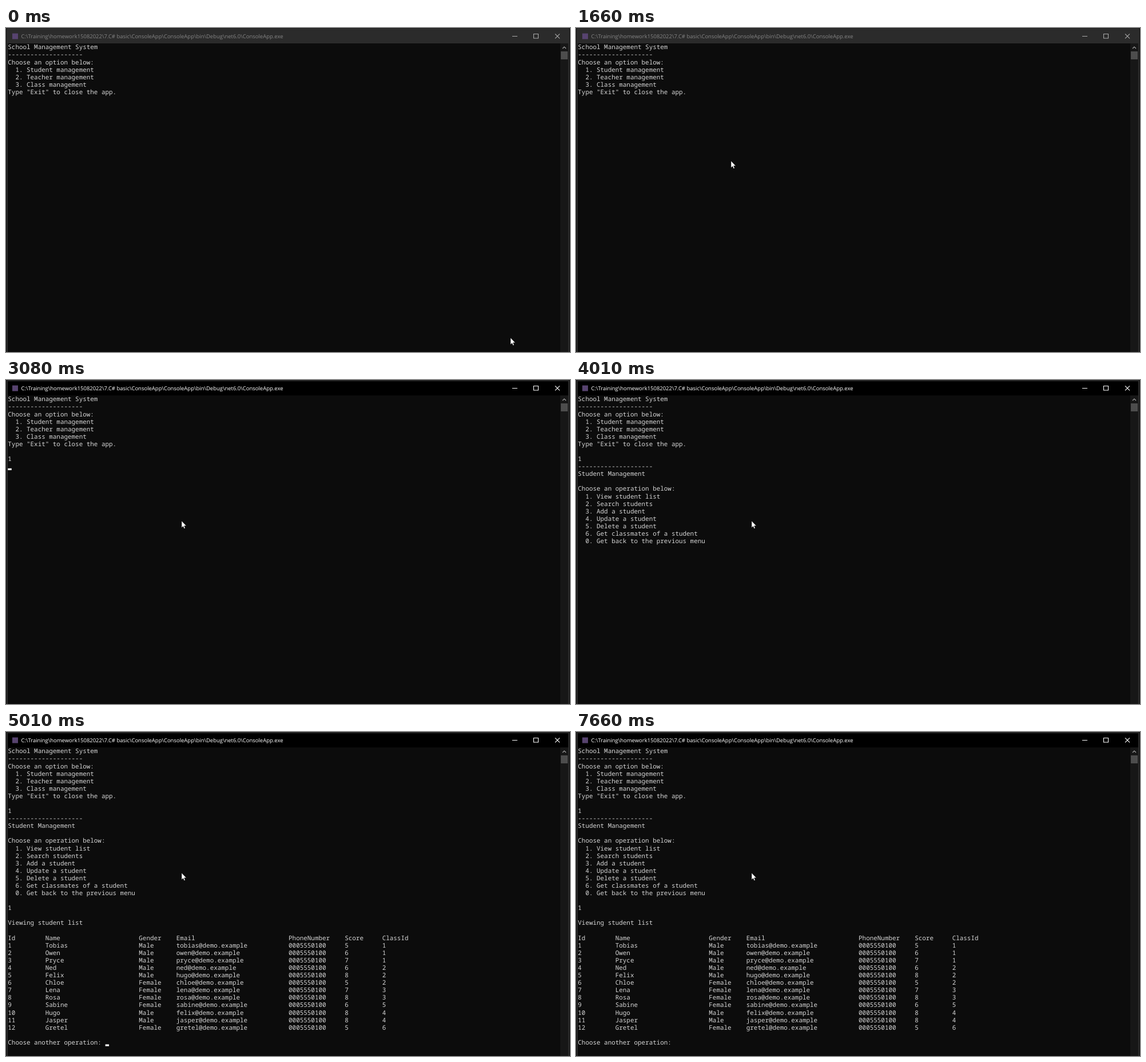
These frames come from a looping animation (986x568 px, 8000 ms). An HTML page:

```html
<!DOCTYPE html>
<html lang="en">
<head>
<meta charset="utf-8">
<title>School Management System</title>
<style>
  html, body { margin: 0; width: 100%; height: 100%; overflow: hidden; background: #191919; }
  svg { display: block; width: 100%; height: 100%; }
  text { white-space: pre; text-rendering: geometricPrecision; font-kerning: none; }
  #console text { font: 10.917px "Noto Sans Mono", "DejaVu Sans Mono", monospace; fill: #d6d6d6; font-variant-ligatures: none; }
  #bar { fill: #2b2b2b; }
  #title { font: 9.48px "Open Sans", "Noto Sans", sans-serif; fill: #858585; }
  #buttons { fill: none; stroke: #aaa; stroke-width: 1.1; }
  .active #bar { fill: #000; }
  .active #title { fill: #fff; }
  .active #buttons { stroke: #fff; }
</style>
</head>
<body>
<svg id="stage" viewBox="0 0 986 568">
  <rect width="986" height="568" fill="#191919"/>
  <rect x="2" y="1" width="982" height="567" fill="#363636"/>
  <rect id="bar" x="3" y="2" width="980" height="25"/>
  <rect x="3" y="27" width="980" height="541" fill="#0c0c0c"/>
  <rect x="11" y="9.5" width="10" height="10" fill="#57436f"/>
  <text id="title" x="26.5" y="18">C:\Training\homework15082022\7.C# basic\ConsoleApp\ConsoleApp\bin\Debug\net6.0\ConsoleApp.exe</text>
  <g id="buttons">
    <path d="M885 14.5h9M922.5 10.5h8v7.5h-8z"/>
    <path d="M960 10.3l8 8m0-8l-8 8"/>
  </g>
  <rect x="969" y="27" width="14" height="541" fill="#171717"/>
  <rect x="970" y="41" width="12" height="14" fill="#4d4d4d"/>
  <path d="M973 36l3-3 3 3" fill="none" stroke="#a0a0a0" stroke-width="1.2"/>
  <g id="console"></g>
  <rect id="caret" width="6.5" height="3.3" fill="#f2f2f2"/>
  <g id="mouse">
    <circle id="click" r="10" fill="#858306"/>
    <path d="M0 0V12L2.7 9.5 4.4 13.6 6.3 12.8 4.6 8.8H8.3Z" fill="#fff" stroke="#000" stroke-width=".5"/>
  </g>
</svg>
<script>
const LOOP = 8000, BLINK = 512, MOUSE_TICK = 66;
const FOCUS = 1860, CLICK_END = 2000, CARET_START = 1930;
const LEFT = 3.3, TOP = 27.4, CHAR = 6.55, LINE = 13.09, ROWS = 40;

const byId = id => document.getElementById(id);
const stage = byId('stage'), caret = byId('caret'), mouse = byId('mouse'), click = byId('click');

const mainMenu = `School Management System
--------------------
Choose an option below:
  1. Student management
  2. Teacher management
  3. Class management
Type "Exit" to close the app.

`;

const studentMenu = `--------------------
Student Management

Choose an operation below:
  1. View student list
  2. Search students
  3. Add a student
  4. Update a student
  5. Delete a student
  6. Get classmates of a student
  0. Get back to the previous menu

`;

const widths = [10, 25, 10, 30, 15, 10, 0];
const tableRow = cells => cells.map((cell, i) => String(cell).padEnd(widths[i])).join('');

// name, mailbox, gender, score, class
const students = `Tobias tobias Male 5 1
Owen owen Male 6 1
Pryce pryce Male 7 1
Ned ned Male 6 2
Felix hugo Male 8 2
Chloe chloe Female 5 2
Lena lena Female 7 3
Rosa rosa Female 8 3
Sabine sabine Female 6 5
Hugo felix Male 8 4
Jasper jasper Male 8 4
Gretel gretel Female 5 6`.split('\n').map((line, i) => {
  const [name, box, gender, score, room] = line.split(' ');
  return tableRow([i + 1, name, gender, `${box}@demo.example`, '0005550100', score, room]);
});

const studentList = ['', '', 'Viewing student list', '',
  tableRow(['Id', 'Name', 'Gender', 'Email', 'PhoneNumber', 'Score', 'ClassId']),
  ...students, '', 'Choose another operation: '].join('\n');

// Console output; the caret stays solid for a while after each write, then blinks.
const writes = [
  { at: 0, solid: 0, text: mainMenu },
  { at: CARET_START, solid: 470, text: '' },
  { at: 2730, solid: 200, text: '1' },
  { at: 3080, solid: 70, text: '\n' },
  { at: 3150, solid: 860, text: studentMenu },
  { at: 4810, solid: 200, text: '1' },
  { at: 5010, solid: 600, text: studentList }
];

// Each glide starts where the last one ended and bends towards its control point.
const home = [882, 543];
const glides = [
  { at: 70, steps: 5, bend: [210, -68], to: [296, 232] },
  { at: 600, steps: 4, bend: [306, 222], to: [318, 213] },
  { at: 1460, steps: 4, bend: [290, 225], to: [271, 233] },
  { at: FOCUS, steps: 6, bend: [257, 242], to: [304, 247] },
  { at: 2600, steps: 1, bend: [306, 247], to: [307, 247] }
];

const rows = Array.from({ length: ROWS }, (_, row) => {
  const text = document.createElementNS(stage.namespaceURI, 'text');
  text.setAttribute('x', LEFT);
  text.setAttribute('y', TOP + row * LINE + 10);
  byId('console').append(text);
  return text;
});

const show = (node, on) => node.setAttribute('visibility', on ? 'visible' : 'hidden');

function drawConsole(t) {
  const done = writes.filter(write => write.at <= t);
  const lines = done.map(write => write.text).join('').split('\n');
  rows.forEach((node, i) => {
    const line = lines[i] || '';
    if (node.textContent !== line) node.textContent = line;
  });

  const { at, solid } = done.at(-1);
  const idle = t - at - solid;
  caret.setAttribute('x', LEFT + lines.at(-1).length * CHAR);
  caret.setAttribute('y', TOP + lines.length * LINE - 3.5);
  show(caret, t >= CARET_START && (idle < 0 || Math.floor(idle / BLINK) % 2 === 1));
}

function pointerAt(t) {
  let from = home;
  for (const { at, steps, bend, to } of glides) {
    if (t < at) break;
    const u = Math.min(1, (Math.floor((t - at) / MOUSE_TICK) + 1) / steps), v = 1 - u;
    from = from.map((start, i) => v * v * start + 2 * u * v * bend[i] + u * u * to[i]);
  }
  return from;
}

function draw(t) {
  stage.classList.toggle('active', t >= FOCUS);
  drawConsole(t);
  const [x, y] = pointerAt(t).map(Math.round);
  mouse.setAttribute('transform', `translate(${x} ${y})`);
  show(click, t >= FOCUS && t < CLICK_END);
}

const origin = performance.now();
function tick() {
  draw((performance.now() - origin) % LOOP);
  requestAnimationFrame(tick);
}
tick();
</script>
</body>
</html>
```
